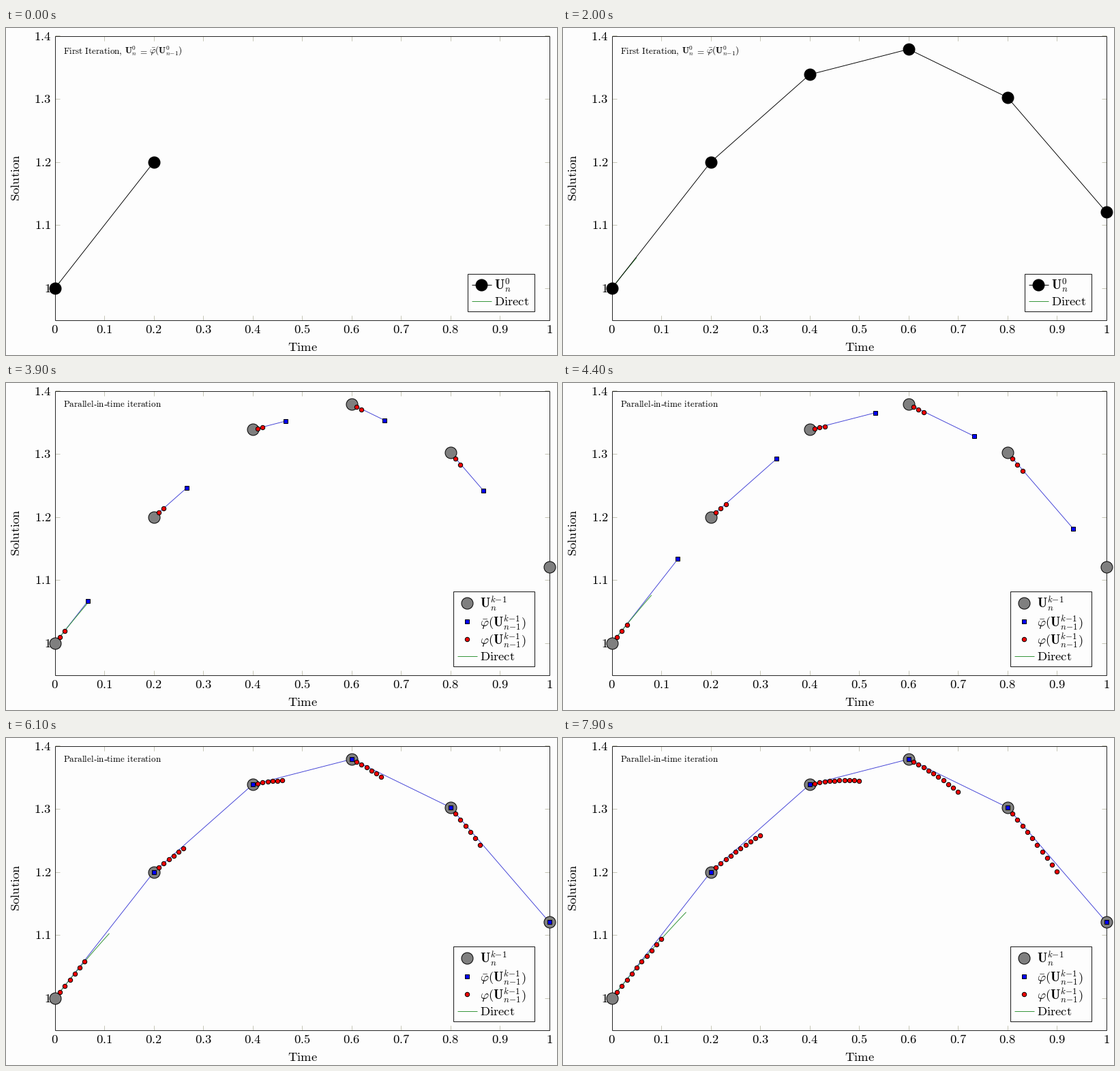
A matplotlib script for the animation above (8000 ms loop, 808 px wide and 480 px high).

```python
import matplotlib.pyplot as plt
import numpy as np
from matplotlib.animation import FuncAnimation
from matplotlib.patches import Rectangle

plt.rcParams["mathtext.fontset"] = "cm"

W, H, DPI = 808, 480, 100
PX = 72 / DPI                      # points per pixel
INK, TICK, GRAY = "#262626", "#c6c6b6", "#7f7f7f"
GREEN, BLUE, RED = "#38963c", "#4242d6", "#f00000"
EM, SMALL = 18.6, 13.15

fig = plt.figure(figsize=(W / DPI, H / DPI), dpi=DPI, facecolor="#fdfdfd")
ax = fig.add_axes([0, 0, 1, 1])
ax.set(xlim=(0, W), ylim=(H, 0))
ax.axis("off")


def sx(t):
    return 71.8 + 725 * np.asarray(t)


def sy(u):
    return 381.9 - 926.3 * (np.asarray(u) - 1)


def line(x=(), y=(), color=INK, width=1.0, z=2):
    return ax.plot(x, y, color=color, lw=width * PX, zorder=z,
                   solid_capstyle="butt")[0]


def marks(kind, size, face, z, x=(), y=()):
    return ax.plot(x, y, kind, ms=size * PX, mfc=face, mec="black",
                   mew=PX, zorder=z)[0]


def label(x, y, math, size=EM, ha="left", **kw):
    return ax.text(x, y, f"${math}$", size=size * PX, ha=ha, va="baseline",
                   color="black", zorder=6, **kw)


def roman(words):
    return r"\mathrm{" + words.replace(" ", r"\hspace{.38}") + "}"


def big(x=(), y=(), face="black"):
    return marks("o", 17, face, 7, x, y)


def square(x=(), y=()):
    return marks("s", 6.6, "#0000f8", 8, x, y)


def dot(x=(), y=()):
    return marks("o", 6.4, RED, 9, x, y)


# Axes box, ticks and labels
LEFT, RIGHT, TOP, BOTTOM = 71.5, 796.5, 11.5, 428.5
for k in range(11):
    x = sx(k / 10)
    if 0 < k < 10:
        line([x, x], [BOTTOM, BOTTOM - 7], TICK, z=1)
        line([x, x], [TOP, TOP + 7], TICK, z=1)
    label(x, 447.7, roman(f"{k / 10:g}"), ha="center")
for k in range(5):
    y = sy(1 + k / 10)
    line([LEFT, LEFT + 7], [y, y], TICK, z=1)
    line([RIGHT - 7, RIGHT], [y, y], TICK, z=1)
    label(66.2, y + 6.2, roman(f"{1 + k / 10:g}"), ha="right")
ax.add_patch(Rectangle((LEFT, TOP), RIGHT - LEFT, BOTTOM - TOP, fill=False,
                       ec=INK, lw=PX, zorder=2))
label(434.5, 474, roman("Time"), ha="center")
label(20, 220, roman("Solution"), ha="center", rotation=90,
      rotation_mode="anchor")


# Captions
def caption_first():
    return [label(84, 38, roman("First Iteration") + ",", SMALL),
            label(173.5, 38, r"\mathbf{U}_n^0", SMALL),
            label(193.5, 38, "{=}", SMALL),
            label(210.5, 38, r"\bar{\varphi}(\mathbf{U}_{n{-}1}^0)", SMALL)]


def caption_moving():
    return [label(84, 35.3, roman("Moving to next iteration"), SMALL)]


def caption_parallel():
    hyphens = [line([x, x + 3.6], [32, 32], "black", z=6)
               for x in (84 + 3.39 * SMALL, 84 + 4.56 * SMALL)]
    return hyphens + [
        label(84, 35.3, roman("Parallel in time iteration"), SMALL)]


# Legends
def legend_box(left, top):
    box = Rectangle((left, top), 774.5 - left, 415.5 - top, fc="#fdfdfd",
                    ec=INK, lw=1.1 * PX, zorder=4)
    ax.add_patch(box)
    return [box, line([left + 6, left + 35], [400.5] * 2, GREEN, z=5),
            label(left + 39.2, 406.8, roman("Direct"))]


def legend_single(symbol, face, joined):
    parts = legend_box(676.5, 360.5)
    if joined:
        parts.append(line([682.5, 711.5], [376.5] * 2, "black", z=5))
    return parts + [big([697], [376.7], face), label(715.7, 383.8, symbol)]


def legend_parallel():
    arg = r"(\mathbf{U}_{n{-}1}^{k{-}1})"
    return legend_box(655.5, 306) + [
        big([676.2], [322.7], GRAY), square([676.2], [349.5]),
        dot([676.2], [376.3]),
        label(694.8, 329.8, r"\mathbf{U}_n^{k{-}1}"),
        label(694.8, 357.6, r"\bar{\varphi}" + arg),
        label(694.8, 383.6, r"\varphi" + arg)]


first, previous = r"\mathbf{U}_n^0", r"\mathbf{U}_n^{k{-}1}"
cap_first, cap_moving, cap_par = (caption_first(), caption_moving(),
                                  caption_parallel())
leg_first = legend_single(first, "black", True)
leg_loose = legend_single(first, "black", False)
leg_prev = legend_single(previous, GRAY, False)
leg_par = legend_parallel()
groups = [cap_first, cap_moving, cap_par,
          leg_first, leg_loose, leg_prev, leg_par]

# Coarse solution, and slope and curvature of each fine solution
nodes = np.linspace(0, 1, 6)
coarse = np.array([1, 1.2, 1.3385, 1.3787, 1.3023, 1.1205])
slope = np.array([1, .69, .19, -.4, -.95])
curve = np.array([-.64, -1.1, -1.3, -1.2, -.7])

direct = line(color=GREEN, z=3)
path = line(color="black", width=.95, z=3.2)
sweeps = [line(color=BLUE, width=.95, z=2.8) for _ in slope]
points, squares, dots = big(), square(), dot()


def show(*visible):
    for group in groups:
        for artist in group:
            artist.set_visible(any(group is v for v in visible))


def update(i):
    step = (i + 1) // 5            # the picture advances every half second
    n = max(step - 6, 0)           # fine steps taken
    if step < 5:
        show(cap_first, leg_first)
    elif step == 5:
        show(cap_moving, leg_loose)
    elif step == 6:
        show(cap_moving, leg_prev)
    else:
        show(cap_par, leg_par)

    count = min(step + 2, 6)
    x, y = sx(nodes[:count]), sy(coarse[:count])
    points.set_data(x, y)
    points.set_markerfacecolor("black" if step < 6 else GRAY)
    path.set_data(x, y)
    path.set_visible(step < 5)

    t = np.linspace(0, .01 * (min(step + 1, 5) + n), 40)
    direct.set_data(sx(t), sy(1 + t - .61 * t ** 2))

    reach = min(max(n - 1, 0) / 3, 1)
    ends_x = nodes[:-1] + reach * np.diff(nodes)
    ends_y = coarse[:-1] + reach * np.diff(coarse)
    for k, sweep in enumerate(sweeps):
        sweep.set_data(sx([nodes[k], ends_x[k]]), sy([coarse[k], ends_y[k]]))
    squares.set_data(sx(ends_x), sy(ends_y))
    squares.set_visible(n > 0)

    s = .01 * np.arange(1, n + 1)[:, None]
    dots.set_data(sx(nodes[:-1] + s).ravel(),
                  sy(coarse[:-1] + slope * s + curve * s ** 2).ravel())
    return []


anim = FuncAnimation(fig, update, frames=80, interval=100, repeat=True,
                     repeat_delay=0, init_func=lambda: update(0))
plt.show()
```
